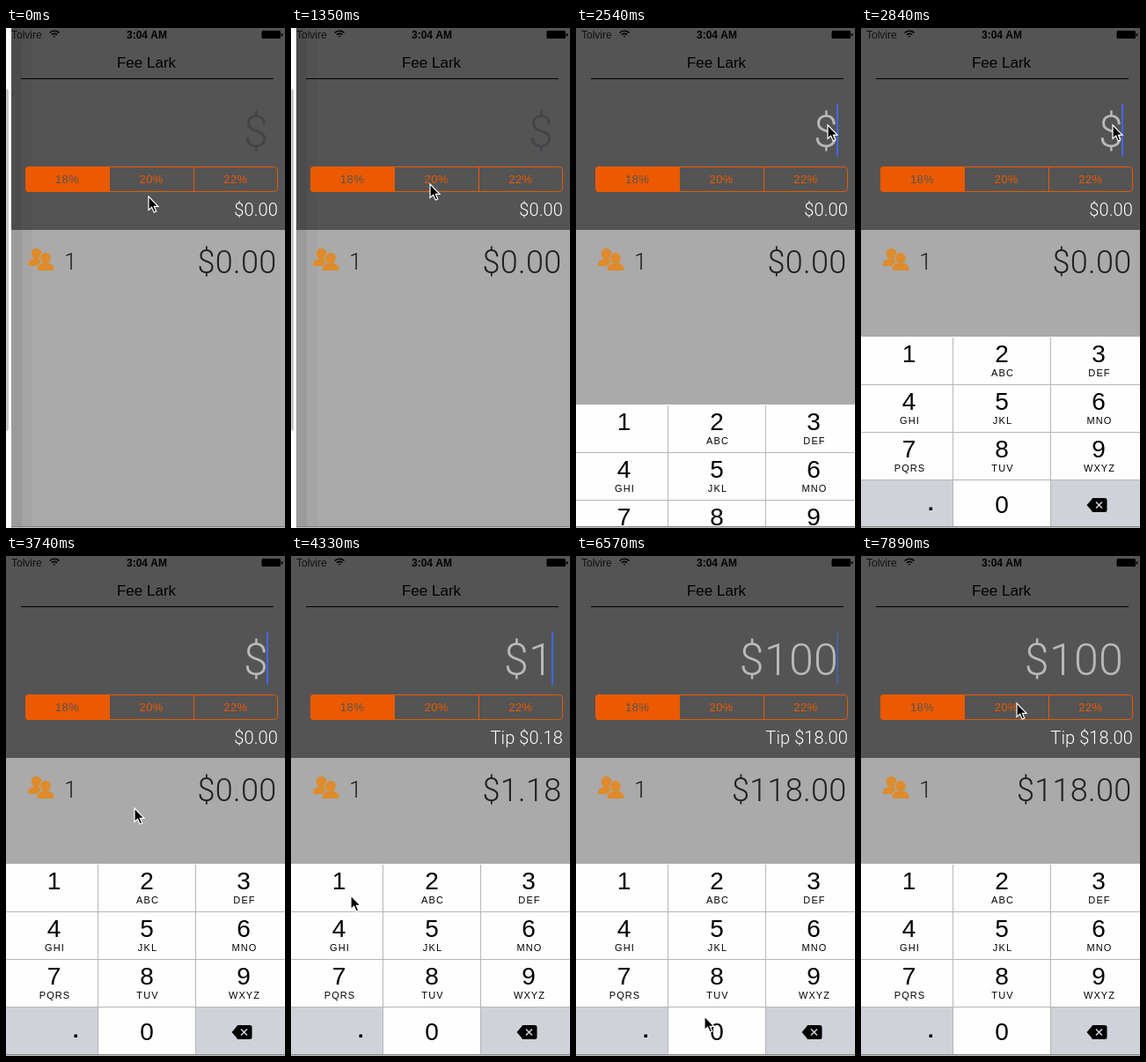
An HTML page with a canvas that plays this animation: 317 px wide and 567 px high, repeating every 8 s.

```html
<!DOCTYPE html>
<html lang="en">
<head>
<meta charset="utf-8">
<title>Tip calculator</title>
<style>
  html, body { margin: 0; height: 100%; overflow: hidden; background: #aaa; }
  canvas { display: block; }
</style>
</head>
<body>
<canvas id="stage" width="317" height="567"></canvas>
<script>
const ctx = document.getElementById('stage').getContext('2d');
const LOOP = 8000, TICK = 149; // ms; the screen refreshes once per tick
const ORANGE = '#eb5a00', HEADER = '#545454', PAPER = '#aaa', INK = '#231f24';
const KEY_WHITE = '#fefefe', KEY_GRAY = '#cfd2d9';
const SANS = '"Liberation Sans", Arial, sans-serif';
const LIGHT = 'Roboto, "Liberation Sans", sans-serif';

// All script times are in ticks.
const FOCUS = 11, OPEN = 17;
const START = { x: 162, y: 191 };
const MOVES = [
  { from: 0, to: 1, x: 158, y: 185 },
  { from: 8, to: 9, x: 158, y: 177 },
  { from: 11, to: 15, x: 286, y: 110 },
  { from: 23, to: 28, x: 68, y: 385 },
  { from: 29, to: 34, x: 146, y: 522 },
  { from: 46, to: 53, x: 177, y: 167 },
];
const PRESSES = [{ at: 28, key: '1' }, { at: 36, key: '0' }, { at: 40, key: '0' }];
const KEYS = ['1', '2 ABC', '3 DEF', '4 GHI', '5 JKL', '6 MNO', '7 PQRS', '8 TUV', '9 WXYZ',
  '.', '0', 'delete'];
const COLUMNS = [{ x: 0, w: 104, mid: 54.5 }, { x: 105, w: 110, mid: 160 }, { x: 216, w: 101, mid: 270 }];

function rect(x, y, w, h, color) {
  ctx.fillStyle = color;
  ctx.fillRect(x, y, w, h);
}

function roundRect(x, y, w, h, radii, color) {
  ctx.beginPath();
  ctx.roundRect(x, y, w, h, radii);
  ctx.fillStyle = color;
  ctx.fill();
}

function polygon(points, color) {
  ctx.beginPath();
  points.forEach(([x, y]) => ctx.lineTo(x, y));
  ctx.closePath();
  ctx.fillStyle = color;
  ctx.fill();
}

function text(str, x, y, font, color, align = 'left', spacing = 0) {
  ctx.font = font;
  ctx.fillStyle = color;
  ctx.textAlign = align;
  ctx.letterSpacing = spacing + 'px';
  ctx.fillText(str, x, y);
}

function pointerAt(tick) {
  let { x, y } = START;
  for (const move of MOVES) {
    const k = Math.min(1, Math.max(0, (tick - move.from) / (move.to - move.from)));
    const eased = 1 - (1 - k) ** 2;
    x += (move.x - x) * eased;
    y += (move.y - y) * eased;
  }
  return [Math.round(x), Math.round(y)];
}

// The caret fades out and back in every 7 ticks, starting over after each key.
function caretAlpha(tick, typed) {
  const since = typed ? PRESSES[typed - 1].at + 1 : OPEN;
  const phase = (tick - since) % 7;
  return phase < 3 ? 1 : phase % 3 ? 0 : 0.5;
}

function drawStatusBar() {
  text('Tolvire', 6, 11.5, '12px ' + SANS, '#111');
  text('3:04 AM', 160, 11.5, 'bold 12px ' + SANS, '#000', 'center');
  ctx.strokeStyle = '#000';
  ctx.lineWidth = 1.6;
  for (const r of [1, 4.2, 7.4]) {
    ctx.beginPath();
    ctx.arc(55, 10.6, r, -Math.PI * 0.76, -Math.PI * 0.24);
    ctx.stroke();
  }
  roundRect(290.5, 3, 21.5, 9, 1.5, '#000');
  roundRect(312.7, 6, 1.8, 3.4, 1, '#000');
}

function drawSegments() {
  ctx.lineWidth = 1;
  ctx.strokeStyle = ORANGE;
  ctx.beginPath();
  ctx.roundRect(22.5, 157.5, 286, 28, 4);
  ctx.moveTo(213.5, 158);
  ctx.lineTo(213.5, 185);
  ctx.stroke();
  roundRect(22, 157, 96, 29, [4, 0, 0, 4], ORANGE);
  ['18%', '20%', '22%'].forEach((label, i) =>
    text(label, 69.5 + 95.7 * i, 176, '13px ' + SANS, i ? ORANGE : HEADER, 'center', 0.4));
}

// A head over rounded shoulders, with a paper-coloured gap around it.
function drawPerson(x, y) {
  ctx.beginPath();
  ctx.ellipse(x, y, 5.8, 6.2, 0, 0, 7);
  ctx.roundRect(x - 9.5, y + 6, 19, 8, [6, 6, 1, 1]);
  ctx.strokeStyle = PAPER;
  ctx.lineWidth = 2.4;
  ctx.stroke();
  ctx.fillStyle = '#de8b2c';
  ctx.fill();
}

function drawBackspace(y) {
  polygon([[256.5, y], [263.5, y - 8], [270, y - 8], [270, y + 8], [263.5, y + 8]], '#000');
  roundRect(262, y - 8, 17.5, 16, 2.5, '#000');
  ctx.strokeStyle = KEY_GRAY;
  ctx.lineWidth = 1.6;
  ctx.beginPath();
  for (const s of [-1, 1]) {
    ctx.moveTo(267, y - 3.5 * s);
    ctx.lineTo(274, y + 3.5 * s);
  }
  ctx.stroke();
}

function drawKeyboard(top, pressed) {
  rect(0, top, 317, 218, '#b4b6ba');
  rect(0, top, 317, 1, KEY_WHITE);
  KEYS.forEach((key, i) => {
    const { x, w, mid } = COLUMNS[i % 3], y = top + 54 * Math.floor(i / 3);
    const [label, letters] = key.split(' ');
    const gray = key === '.' || key === 'delete' || key === pressed;
    rect(x, y + 1, w, 53, gray ? KEY_GRAY : KEY_WHITE);
    if (key === '.') rect(77.5, y + 31.5, 3.5, 3.5, '#000');
    else if (key === 'delete') drawBackspace(y + 29);
    else text(label, mid, y + (key === '0' ? 38 : 29), '28px ' + SANS, '#000', 'center');
    if (letters) text(letters, mid + 1, y + 45, '11px ' + SANS, '#000', 'center', 1.1);
  });
}

function drawPointer(x, y) {
  const arrow = [[0, 0], [0, 15.5], [3.6, 12.2], [6.2, 18], [8.8, 16.9], [6.3, 11.3], [11, 11.3]];
  polygon(arrow.map(([dx, dy]) => [x + dx, y + dy]), '#000');
  ctx.strokeStyle = '#fff';
  ctx.lineWidth = 1.2;
  ctx.stroke();
}

// Edge and shadow of the window in front, until the app gets the focus.
function drawOtherWindow() {
  rect(6, 0, 12, 565, 'rgba(0,0,0,.09)');
  rect(18, 0, 12, 565, 'rgba(0,0,0,.03)');
  rect(0, 0, 6, 567, '#fefefe');
  roundRect(-4, 69, 7, 388, 3, '#c6c6c6');
}

function draw(tick) {
  const done = PRESSES.filter(p => p.at < tick);
  const press = PRESSES.find(p => p.at === tick);
  const bill = done.map(p => p.key).join('');
  const active = tick >= OPEN;

  rect(0, 0, 317, 567, PAPER);
  rect(0, 0, 317, 229, HEADER);
  rect(0, 565, 317, 1, '#808080');
  rect(0, 566, 317, 1, '#c4c4c4');
  if (tick < FOCUS) drawOtherWindow();
  drawStatusBar();
  text('Fee Lark', 159.5, 45, '17px ' + SANS, '#000', 'center');
  rect(17, 57, 287, 1, '#000');

  text('$' + bill, 298, 135, '300 50px ' + LIGHT, active ? '#b9b9b9' : '#434448', 'right', 0.3);
  drawSegments();
  text((bill && 'Tip ') + '$' + (bill * 0.18).toFixed(2), 309, 213, '300 20px ' + LIGHT, '#fff', 'right', 0.1);
  drawPerson(34.5, 256);
  drawPerson(45, 261);
  text('1', 66, 274, '300 26px ' + LIGHT, INK);
  text('$' + (bill * 1.18).toFixed(2), 307.5, 278, '300 36px ' + LIGHT, INK, 'right', 0.3);

  if (active) {
    const slide = Math.round(78 * 0.13 ** (tick - OPEN));
    ctx.save();
    ctx.beginPath();
    ctx.rect(0, 0, 317, 565);
    ctx.clip();
    drawKeyboard(349 + slide, press && press.key);
    ctx.restore();
    ctx.globalAlpha = press ? 1 : caretAlpha(tick, done.length);
    rect(296, 86, 2, 60, '#4167f2');
    ctx.globalAlpha = 1;
  }
  drawPointer(...pointerAt(tick));
}

function loop() {
  const now = performance.now() % LOOP;
  draw(Math.floor((now + 12) / TICK));
  requestAnimationFrame(loop);
}
loop();
</script>
</body>
</html>
```
